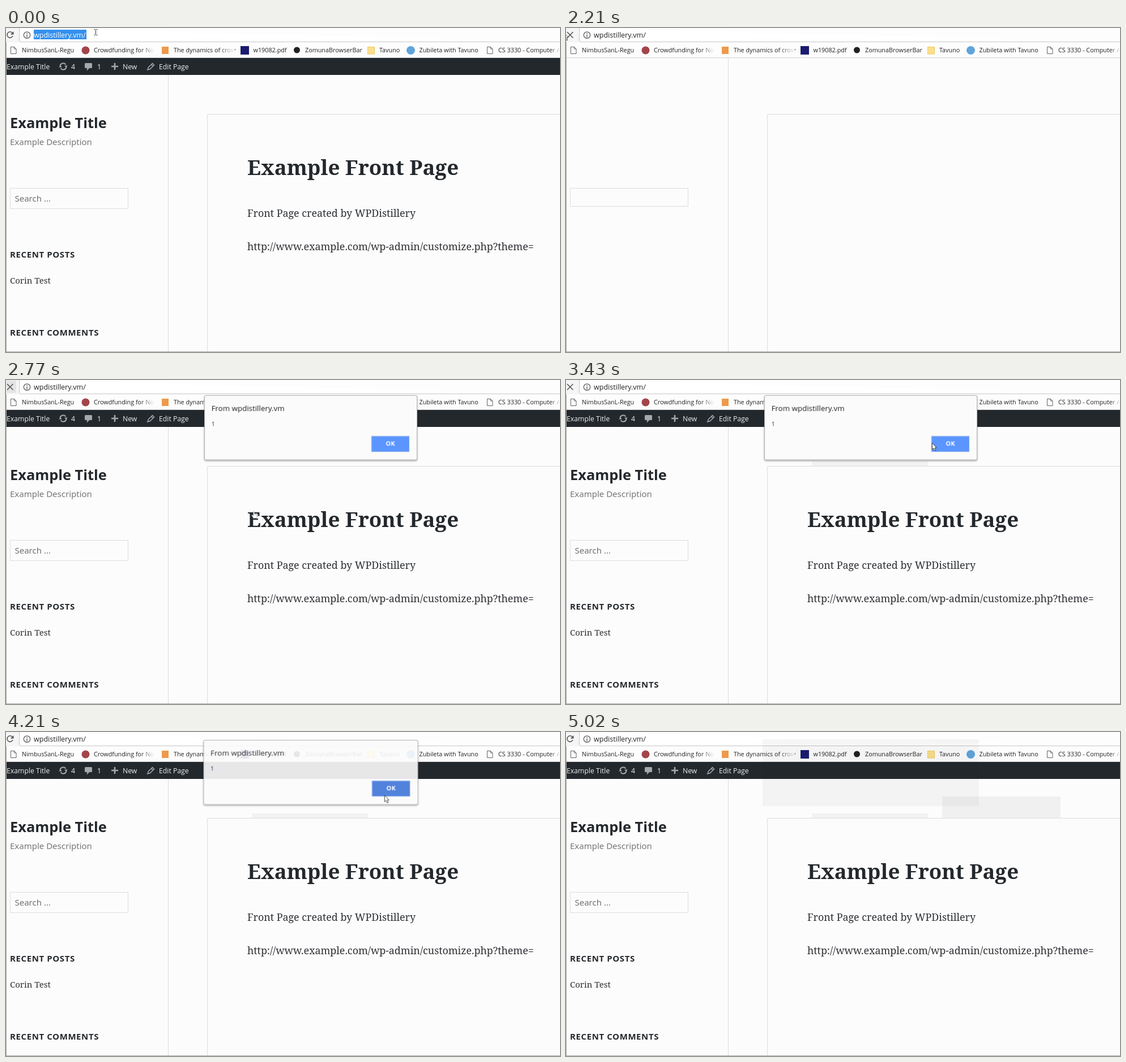
Write an HTML page that moves like this. It is 978 by 573 pixels and loops after 5420 ms.

```html
<!DOCTYPE html>
<html lang="en">
<head>
<meta charset="utf-8">
<title>Page load with alert</title>
<style>
html, body { margin: 0; width: 100%; height: 100%; overflow: hidden; background: #fcfcfc; }
svg { display: block; width: 978px; height: 573px; }
text { white-space: pre; }
.ui { font-family: "Open Sans", "Noto Sans", sans-serif; font-size: 10.8px; fill: #222; }
.bar { font: 500 12.25px "Open Sans", "Noto Sans", sans-serif; fill: #eee; }
.sans { font-family: "Noto Sans", "Open Sans", sans-serif; font-size: 15px; fill: #24282c; }
.serif { font-family: "Noto Serif", serif; font-size: 17.85px; fill: #2c2f33; }
.widget { font-weight: 700; letter-spacing: .04em; }
.line { fill: none; stroke: #dedede; }
.glyph { fill: none; stroke: #505050; stroke-width: 1.5; }
.paper { fill: #fff; stroke: #606060; }
.icon { fill: none; stroke: #a3a8ac; stroke-width: 2; }
.solid { fill: #a3a8ac; stroke: none; }

/* hard cuts on one shared clock */
.a { animation: 5420ms step-end infinite; }
.select { animation-name: select; }
.address { animation-name: address; }
.reload { animation-name: reload; }
.stop { animation-name: stop; }
.hover { animation-name: hover; }
.loaded { animation-name: loaded; }
.empty { animation-name: empty; }
.dialog { animation-name: dialog; }
.press { animation-name: press; }
.ibeam { animation-name: ibeam; }
.busy { animation-name: busy; }
.hand { animation-name: hand; }
.arrow { animation-name: arrow; }
.ring { animation-name: ring; }
.shade1 { animation-name: shade1; }
.shade2 { animation-name: shade2; }
.shade3 { animation-name: shade3; }

@keyframes select { 0% { opacity: 1 } 7.933%, 100% { opacity: 0 } }
@keyframes address { 0% { fill: #fff } 7.933%, 100% { fill: #222 } }
@keyframes reload { 0% { opacity: 1 } 7.933% { opacity: 0 } 77.675%, 100% { opacity: 1 } }
@keyframes stop { 0% { opacity: 0 } 7.933% { opacity: 1 } 77.675%, 100% { opacity: 0 } }
@keyframes hover {
  0% { opacity: 0 } 7.933% { opacity: 1 } 40.774% { opacity: 0 }
  51.106% { opacity: 1 } 53.69%, 100% { opacity: 0 }
}
@keyframes loaded { 0% { opacity: 1 } 40.774% { opacity: 0 } 42.988%, 100% { opacity: 1 } }
@keyframes empty { 0% { opacity: 0 } 40.774% { opacity: 1 } 42.988%, 100% { opacity: 0 } }
@keyframes dialog {
  0% { opacity: 0; transform: none }
  51.106% { opacity: 1; transform: none }
  77.675% { opacity: .91; transform: translate(-4.3px, -13px) scale(1.008, 1) }
  80.442%, 100% { opacity: 0; transform: none }
}
@keyframes press { 0% { fill: #5b95ff } 75.461%, 100% { fill: #4076d9 } }
@keyframes ibeam { 0% { opacity: 1 } 40.774%, 100% { opacity: 0 } }
@keyframes busy { 0% { opacity: 0 } 40.774% { opacity: 1 } 51.106%, 100% { opacity: 0 } }
@keyframes hand { 0% { opacity: 0 } 51.106% { opacity: 1 } 53.69%, 100% { opacity: 0 } }
@keyframes ring { 0% { opacity: 0 } 53.69% { opacity: 1 } 59.963%, 100% { opacity: 0 } }
@keyframes arrow {
  0% { opacity: 0; transform: translate(434px, 236px) }
  53.69% { opacity: 1; transform: translate(434px, 236px) }
  59.963% { opacity: 1; transform: translate(631px, 110.5px) }
  63.284% { opacity: 1; transform: translate(646px, 111px) }
  65.682% { opacity: 1; transform: translate(660px, 111.5px) }
  68.081% { opacity: 1; transform: translate(668px, 111.5px) }
  83.025% { opacity: 1; transform: translate(865px, 414px) }
  85.239% { opacity: 1; transform: translate(618px, 512px) }
  87.638% { opacity: 1; transform: translate(600px, 408px) }
  90.405% { opacity: 1; transform: translate(598px, 396px) }
  92.619%, 100% { opacity: 0; transform: translate(598px, 396px) }
}
@keyframes shade1 { 0% { opacity: 0 } 59.963%, 100% { opacity: .04 } }
@keyframes shade2 { 0% { opacity: 0 } 80.442%, 100% { opacity: .036 } }
@keyframes shade3 { 0% { opacity: 0 } 83.025%, 100% { opacity: .046 } }
</style>
</head>
<body>
<svg viewBox="0 0 978 573" xmlns="http://www.w3.org/2000/svg">
  <defs>
    <linearGradient id="fade">
      <stop offset="0" stop-color="#fdfdfd" stop-opacity="0"/>
      <stop offset="1" stop-color="#fdfdfd"/>
    </linearGradient>
    <filter id="shadow" x="-5%" y="-10%" width="110%" height="125%">
      <feDropShadow dx="0" dy="1.5" stdDeviation="1.5" flood-color="#000" flood-opacity=".4"/>
    </filter>
    <path id="pointer" d="M.4.4V12L3 9.6L5 14L6.8 13.2L5 8.9H8.2Z" fill="#fff" stroke="#222" stroke-width=".8"/>
    <path id="doc" class="paper" d="M.5.5H6.5L10 4V12.5H.5ZM6.5.5V4H10"/>
  </defs>

  <rect width="978" height="573" fill="#fcfcfc"/>

  <!-- page -->
  <path class="line" d="M286.5 53V573M355.5 573V152.5H978"/>
  <rect class="line a empty" x="7.5" y="283.5" width="208" height="32"/>
  <g class="a loaded">
    <rect y="53" width="978" height="30" fill="#23282d"/>
    <g class="bar">
      <text x="1" y="72.5">Example Title</text>
      <text x="115" y="72.5">4</text>
      <text x="161" y="72.5">1</text>
      <text x="206" y="72.5">New</text>
      <text x="270" y="72.5">Edit Page</text>
    </g>
    <g class="icon">
      <path d="M95.5 67A5.5 5.5 0 0 1 105.5 64.8M106.5 69A5.5 5.5 0 0 1 96.5 71.2"/>
      <path class="solid" d="M103 66.5H109L106 70ZM93 69.5H99L96 66Z"/>
      <path class="solid" d="M140.5 62H150.5Q152 62 152 63.5V69.5Q152 71 150.5 71H147L143 75.5V71H140.5Q139 71 139 69.5V63.5Q139 62 140.5 62Z"/>
      <path d="M192 62V74M186 68H198" stroke-width="2.6"/>
      <path d="M250 74L251.5 69.5L258.5 62.5L261.5 65.5L254.5 72.5ZM256.5 64.5L259.5 67.5" stroke-width="1.5"/>
    </g>
    <rect class="line" x="7.5" y="283.5" width="208" height="36"/>
    <g class="sans">
      <text x="7" y="177" font-weight="700" style="font-size:25.4px">Example Title</text>
      <text x="7" y="207" style="fill:#777">Example Description</text>
      <text x="15.5" y="307" style="fill:#707070">Search …</text>
      <text class="widget" x="7" y="406">RECENT POSTS</text>
      <text class="widget" x="7" y="544">RECENT COMMENTS</text>
    </g>
    <g class="serif">
      <text x="7" y="452" style="font-size:15px">Corin Test</text>
      <text x="426" y="260" font-weight="700" style="font-size:36.7px;fill:#24282c">Example Front Page</text>
      <text x="426" y="334">Front Page created by WPDistillery</text>
      <text x="426" y="393">http://www.example.com/wp-admin/customize.php?theme=</text>
    </g>
  </g>

  <!-- browser bars -->
  <rect width="978" height="53" fill="#fdfdfd"/>
  <rect width="24" height="25" fill="#f5f5f5"/>
  <path d="M23.5 0V22Q23.5 24.5 26 24.5H978" fill="#fff" stroke="#c6c6c6"/>
  <path d="M0 52.5H978" stroke="#d2d2d2"/>
  <rect class="a hover" x="1" y="1" width="17" height="22" fill="#e4e4e4"/>
  <g class="a reload">
    <path class="glyph" d="M11.5 9A5.2 5.2 0 1 0 12 14"/>
    <path d="M13.5 6V11.5H8Z" fill="#505050"/>
  </g>
  <path class="glyph a stop" d="M2 7L12.5 17.5M12.5 7L2 17.5"/>
  <circle cx="37" cy="12.5" r="5.7" fill="none" stroke="#555" stroke-width="1.2"/>
  <path d="M37 9V10.5M37 11.7V16" stroke="#555" stroke-width="1.4"/>
  <rect class="a select" x="49" y="3" width="93" height="17" fill="#3390ee"/>
  <text class="ui a address" x="49" y="17" style="font-size:12.5px">wpdistillery.vm/</text>

  <use href="#doc" x="8" y="33"/>
  <circle cx="140.5" cy="39.5" r="7" fill="#a2454a"/>
  <rect x="275" y="33" width="12" height="13" fill="#ee9a4d"/>
  <rect x="414" y="32" width="15" height="15" fill="#1b1c70"/>
  <circle cx="513.5" cy="39" r="5.5" fill="#222"/>
  <path d="M638.5 33.5H650.5V46H638.5Z" fill="#fbe08a" stroke="#ecca68"/>
  <circle cx="714.5" cy="39.5" r="7.5" fill="#5fa5dc"/>
  <use href="#doc" x="849" y="33"/>
  <g class="ui">
    <text x="28" y="43">NimbusSanL-Regu</text>
    <text x="155" y="43">Crowdfunding for No</text>
    <text x="296" y="43">The dynamics of crow</text>
    <text x="436.5" y="43">w19082.pdf</text>
    <text x="528" y="43">ZomunaBrowserBar</text>
    <text x="659" y="43">Tavuno</text>
    <text x="729.5" y="43">Zubileta with Tavuno</text>
    <text x="869" y="43">CS 3330 - Computer A</text>
  </g>
  <g fill="url(#fade)">
    <rect x="236" y="31" width="27" height="18"/>
    <rect x="377" y="31" width="27" height="18"/>
    <rect x="961" y="31" width="17" height="18"/>
  </g>
  <path d="M.5 25V573M0 572.5H978" stroke="#a8a8a8"/>

  <!-- repaint shading -->
  <rect class="a shade1" x="434" y="144" width="205" height="8"/>
  <rect class="a shade2" x="347" y="13" width="382" height="118"/>
  <rect class="a shade3" x="664" y="114" width="209" height="38"/>

  <!-- alert -->
  <g class="a dialog">
    <rect x="350.5" y="27.5" width="375" height="113.5" rx="2.5" fill="#fbfbfb" stroke="#b4b4b4" filter="url(#shadow)"/>
    <g class="ui">
      <text x="362.5" y="54.5" style="font-size:13.35px">From wpdistillery.vm</text>
      <text x="362.5" y="82" style="fill:#1d3f73">1</text>
      <rect class="a press" x="645.5" y="99.5" width="66" height="27" stroke="#7ea6ea"/>
      <text x="678.5" y="116.5" text-anchor="middle" font-weight="700" style="font-size:11px;fill:#fff">OK</text>
    </g>
  </g>

  <!-- pointers -->
  <path class="a ibeam" d="M155.5 2.5H157.5L158.5 3.5L159.5 2.5H161.5M158.5 3.5V11.5M155.5 12.5H157.5L158.5 11.5L159.5 12.5H161.5" fill="none" stroke="#333"/>
  <g class="a busy">
    <use href="#pointer" x="-4" y="8"/>
  </g>
  <path class="a hand" d="M437 244.5L433.5 239.5L434.5 238.5L436.5 240V233.5Q437.5 232 438.5 233.5V237L443.5 238.5V242L442 244.5Z" fill="#fff" stroke="#777" stroke-width=".8"/>
  <circle class="a ring" cx="452" cy="243" r="5.5" fill="none" stroke="#4a9ad4" stroke-width="2"/>
  <g class="a arrow">
    <use href="#pointer"/>
  </g>
</svg>
</body>
</html>
```
